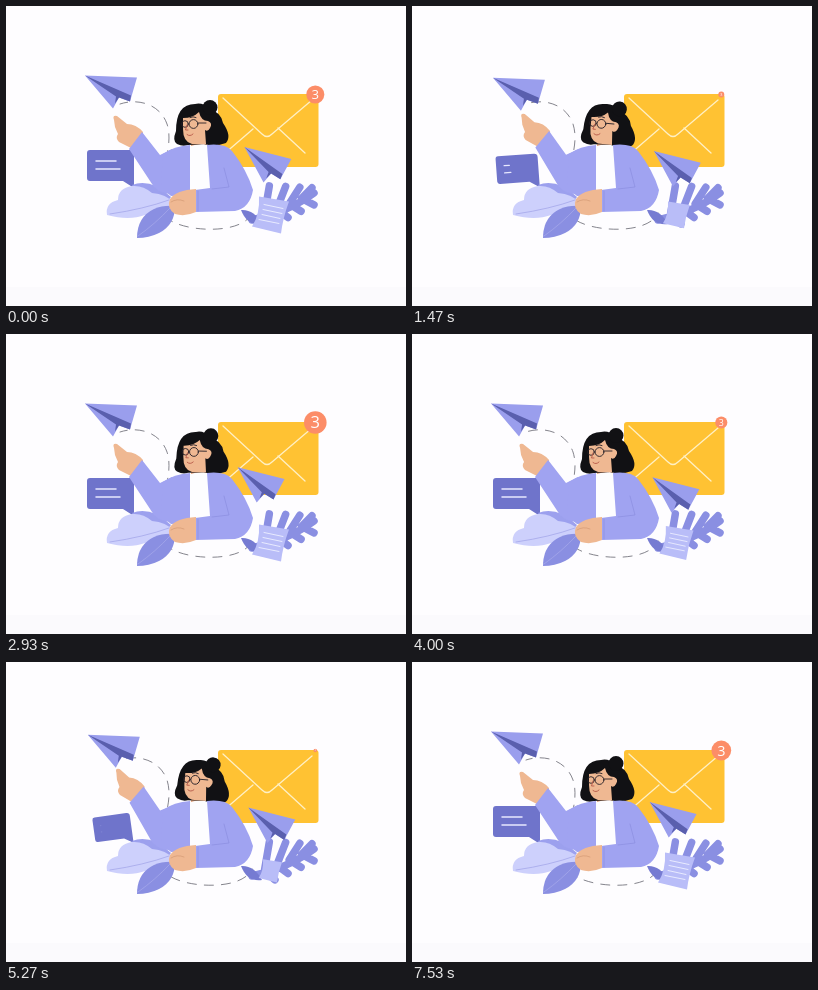
Recreate the animation shown at these times as an HTML page. Size 400x300 px, loop 7600 ms.

```html
<!DOCTYPE html>
<html lang="en">
<head>
<meta charset="utf-8">
<title>New messages</title>
<style>
  html, body { margin: 0; width: 100%; height: 100%; overflow: hidden; background: #fefdff; }
  svg { display: block; width: 400px; height: 300px; }
  .line { fill: none; stroke-linecap: round; stroke-linejoin: round; }
</style>
</head>
<body>
<svg viewBox="0 0 400 300">
  <defs>
    <g id="dart">
      <path fill="#9a9eed" d="M0 0 52 2 45 26 34 22 28 33Z"/>
      <path fill="#5a5fae" d="M0 0 46 20 45 26 34 22 30 28 31 21Z"/>
    </g>
  </defs>
  <rect y="281" width="400" height="19" fill="#fbfafd"/>

  <!-- envelope and badge -->
  <rect x="212" y="88" width="100.500" height="73" rx="3" fill="#ffc233"/>
  <path class="line" stroke="#fff0c4" stroke-width="1.300" d="M217 92 256 128Q261 133 266 128L306 94M218 148 247 123M299 147 272 122"/>
  <g id="badge">
    <circle r="11.300" fill="#fc8d68"/>
    <text y="5.800" fill="#fff" font-family="'Open Sans', 'Noto Sans', sans-serif" font-size="16.500" text-anchor="middle">3</text>
  </g>

  <!-- flight trail -->
  <g class="line" id="trail" stroke="#77777f" stroke-width=".9" stroke-dasharray="9 8">
    <path d="M114 98C132 92 154 98 161 118Q165 130 161 148"/>
    <path d="M160 211C174 226 236 230 246 207"/>
  </g>

  <path class="line" id="fern" stroke="#8a8fe2" stroke-width="7.500"/>
  <path fill="#767bd2" d="M235 204Q248 203 256 218Q241 220 235 204Z"/>
  <g id="note">
    <path fill="#b9bdf8" d="M-11-18 19-13Q13 3 11 19L-18 12Q-10 0-11-18Z"/>
    <path class="line" id="rows" stroke="#eef0ff" stroke-width=".9" d="M-6-10 13-6M-7-5 12-1M-8 0 10 4M-11 5 9 9"/>
  </g>
  <use id="dart2" href="#dart"/>

  <!-- speech bubble -->
  <g id="bubble">
    <path fill="#6f74cb" d="M-40-34H0Q4-34 4-30V4L-7-3H-40Q-43-3-43-6V-31Q-43-34-40-34Z"/>
    <g class="line" id="bars" stroke="#e8e8ff" stroke-width="1.500">
      <path pathLength="1" d="M-34-23H-14"/>
      <path pathLength="1" d="M-34-15H-10"/>
    </g>
  </g>

  <!-- left leaves -->
  <path fill="#9ca0ee" d="M126 179Q145 172 165 191L158 200Q135 195 126 179Z"/>
  <path fill="#cdd0fc" d="M101 209Q99 197 112 194Q112 182 126 180Q137 179 146 187Q160 188 168 197Q157 211 139 209Q123 215 101 209Z"/>
  <path fill="#8a8fe2" d="M131 232Q131 211 148 203Q157 199 169 200Q169 219 153 227Q143 232 131 232Z"/>
  <path class="line" stroke="#a5a8ea" stroke-width=".8" d="M104 208Q138 203 163 194M132 230Q149 218 164 202"/>

  <!-- woman -->
  <path fill="#e3a680" d="M185 130H201V146H185Z"/>
  <path fill="#fdfdff" d="M182 141Q192 137 202 139L203 206H184Z"/>
  <g id="head">
    <path fill="#111114" d="M171 138Q166 135 170 125Q170 98 189 98Q197 96 203 103Q215 106 217 117Q226 130 220 137Q209 141 198 138L182 139Q177 141 171 138Z"/>
    <circle cx="204" cy="101.500" r="7.500" fill="#111114"/>
    <path fill="#efb892" d="M177 112Q187 112 193 106Q195 115 202 115Q207 117 204 122Q202 126 199 124L200 138H186Q177 136 177 123Z"/>
    <g class="line" stroke="#262128" stroke-width=".9">
      <circle cx="187.500" cy="118" r="4.400"/>
      <circle cx="179" cy="118" r="3.300"/>
      <path d="M192 117 200 117M184 111.500Q187 110 190 111.500"/>
      <path stroke="#b75a49" d="M181 119 179.500 124 182 124M181 128.500Q184 131 187 128"/>
    </g>
  </g>
  <g id="arm">
    <path fill="#efb892" d="M108 114Q106 109 111 110L121 118Q130 118 137 126V133L127 143Q119 139 113 136Q109 132 112 128L109 121Z"/>
    <path fill="#a0a3f1" d="M123 143 136 126 154 149 166 143 170 187Q158 190 148 181Z"/>
  </g>
  <path fill="#a0a3f1" d="M157 148Q168 140 184 139L184 189 165 190 155 182Z"/>
  <path fill="#a0a3f1" d="M201 139Q219 137 226 145Q241 164 247 184Q244 202 229 205L189 206V184L204 182Z"/>
  <path class="line" stroke="#8c8fe0" stroke-width=".7" d="M218 162 223 181 206 183M192 185V205"/>
  <path fill="#efb892" d="M190 183V206Q179 211 169 208Q160 202 164 193Q170 184 190 183Z"/>
  <path class="line" stroke="#cf9470" stroke-width=".6" d="M165 196Q171 192 178 195"/>

  <use id="dart1" href="#dart"/>
</svg>
<script>
const LOOP = 7600, SWING = 3800;
const $ = id => document.getElementById(id);
const move = (id, value) => $(id).setAttribute('transform', value);

// Progress of u from a to b, clamped to 0..1, and its easings
const ramp = (u, a, b) => Math.min(1, Math.max(0, (u - a) / (b - a)));
const quadOut = x => 1 - (1 - x) ** 2;
const sineOut = x => Math.sin(x * Math.PI / 2);
const smooth = x => x * x * (3 - 2 * x);

// Leaf fingers on both sides of a rising spine
function fern() {
  let d = 'M246 214Q282 206 308 187';
  const finger = (x, y, angle, length) =>
    d += `M${x} ${y}l${length * Math.cos(angle)} ${length * Math.sin(angle)}`;
  for (let k = .2; k < .9; k += .2) {
    const x = 246 + 62 * k, y = 214 - 27 * k;
    finger(x, y, -1.6 + k, 34 - 24 * k);
    finger(x, y, .8 - .4 * k, 14);
  }
  $('fern').setAttribute('d', d);
}

function draw(t) {
  // The second swing lags slightly behind the first
  const late = t > SWING ? 60 * Math.sin(Math.PI * (t - SWING) / SWING) : 0;
  const p = t % SWING - late;
  // Everything plays forward, then backward, between 0 and 1900
  const u = Math.abs((p + 4790) % SWING - 1900);

  const rise = 1 - smooth(ramp(u, 350, 750));
  move('dart1', `translate(${79 + 4.2 * rise} ${69.5 + 4.8 * rise})`);
  move('arm', `rotate(${5.5 * rise} 160 150)`);

  const glide = Math.cos(Math.PI * u / 1900);
  move('dart2', `translate(${238 + 6.5 * glide} ${140.5 + 7.5 * glide}) rotate(12) scale(.93)`);

  move('badge', `translate(309.300 88.500) scale(${sineOut(ramp(u, 420, 1250))})`);

  const pop = quadOut(ramp(u, 250, 710));
  move('bubble', `translate(124 178) rotate(${40 * (pop - 1)}) scale(${pop})`);
  const bar = ramp(u, 500, 710);
  $('bars').setAttribute('stroke-dasharray', `${bar} 2`);
  $('bars').setAttribute('opacity', ramp(bar, 0, .2));

  move('note', `translate(264 208.500) scale(${quadOut(ramp(u, 250, 900))})`);
  $('rows').setAttribute('opacity', ramp(u, 560, 710));

  move('head', `rotate(${7 * Math.sin(Math.PI * p / SWING) ** 4} 190 138)`);
  $('trail').setAttribute('stroke-dashoffset', u / 50);
}

const start = performance.now();
function tick() {
  draw((performance.now() - start) % LOOP);
  requestAnimationFrame(tick);
}
fern();
tick();
</script>
</body>
</html>
```
